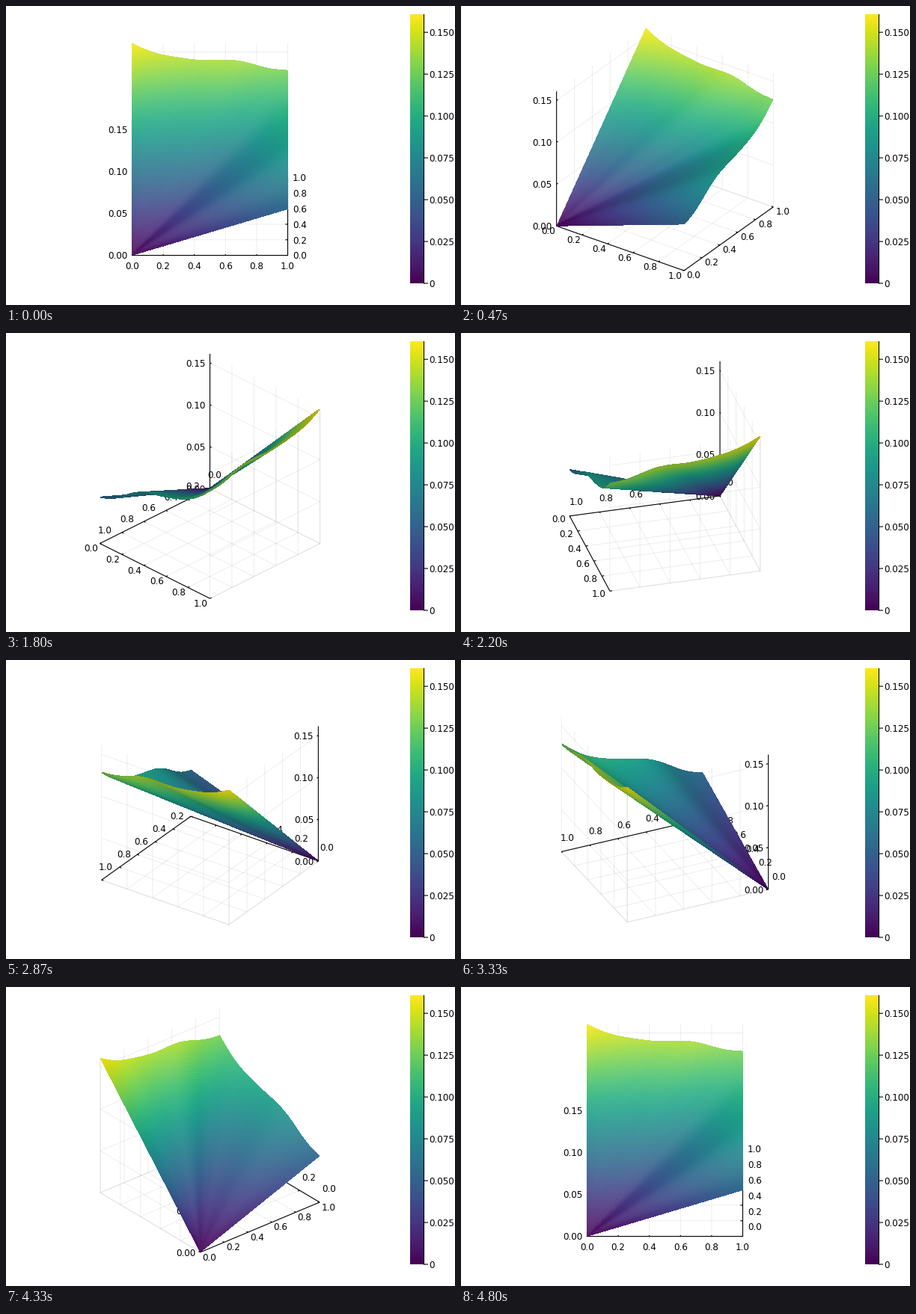
Recreate the animation shown at these times as a matplotlib script. Size 600 px wide and 400 px high, loop 4870 ms.

```python
import numpy as np
import matplotlib.pyplot as plt
from matplotlib.animation import FuncAnimation
from matplotlib.collections import LineCollection, PolyCollection

WIDTH, HEIGHT, DPI = 600, 400, 100
FRAMES, STEP_MS = 73, 66.66      # 15 pictures a second, 5 degrees each
PX = 72 / DPI                    # points per pixel
CENTER, SIDE = (272.5, 191.5), 208
SIN_EL, COS_EL = 0.5, np.sqrt(0.75)
Z_MAX = 0.1608
FONT = dict(family="DejaVu Sans", size=12 * PX, color="black")
TICK, LABEL_GAP = 0.015, 6.3

xy_ticks = np.linspace(0, 1, 6)
z_ticks = np.arange(4) * 0.05
viridis = plt.get_cmap("viridis")


def project(points, az):
    """Orthographic view of unit-cube points, in stage pixels."""
    x, y, z = np.moveaxis(np.asarray(points, float) - 0.5, -1, 0)
    c, s = np.cos(az), np.sin(az)
    px = CENTER[0] + SIDE * (x * c + y * s)
    py = CENTER[1] + SIDE * (SIN_EL * (x * s - y * c) - COS_EL * z)
    return np.stack([px, py], axis=-1)


def wavy(t, start, end, waves):
    """Straight line from start to end plus a short sine series."""
    bumps = sum(b * np.sin(n * np.pi * t) for n, b in enumerate(waves, 1))
    return start + (end - start) * t + bumps


def height(x, y):
    """Surface that is linear along every ray from the origin."""
    r = np.maximum(x, y)
    t = np.minimum(x, y) / r
    low = wavy(t, 0.344, 0.8, (-0.017, 0.0275, -0.0183, -0.0047, -0.005))
    high = wavy(t, 1.0, 0.8, (-0.0282, -0.0253, -0.0076, 0.0039, -0.0058))
    return r * np.where(y <= x, low, high)


def make_cells(n=76):
    u = np.linspace(0.004, 0.996, n + 1)
    x, y = np.meshgrid(u, u, indexing="ij")
    p = np.stack([x, y, height(x, y)], axis=-1)
    quads = np.stack([p[:-1, :-1], p[1:, :-1], p[1:, 1:], p[:-1, 1:]], axis=2)
    return quads.reshape(-1, 4, 3)


cells = make_cells()
cell_mid = cells.mean(axis=1)
cell_color = viridis(cell_mid[:, 2])[:, :3]
normals = np.cross(cells[:, 2] - cells[:, 0], cells[:, 3] - cells[:, 1])
normals /= np.linalg.norm(normals, axis=1, keepdims=True)


def shaded_colors(az):
    """Headlight shading: darker edge-on, slightly whitened face-on."""
    view = np.array([COS_EL * np.sin(az), -COS_EL * np.cos(az), SIN_EL])
    light = 0.7 + 0.45 * np.abs(normals @ view)[:, None]
    white = np.maximum(light - 1, 0)
    return cell_color * np.minimum(light, 1) * (1 - white) + white


x_pos = [(t, 0, 0) for t in xy_ticks]
y_pos = [(1, t, 0) for t in xy_ticks]
z_pos = [(0, 0, t / Z_MAX) for t in z_ticks]

grid_paths = (
    [[(t, 0, 0), (t, 1, 0), (t, 1, 1)] for t in xy_ticks]
    + [[(1, t, 0), (0, t, 0), (0, t, 1)] for t in xy_ticks]
    + [[(0, 0, h), (0, 1, h), (1, 1, h)] for _, _, h in z_pos])
axis_paths = (
    [[(0, 0, 0), (1, 0, 0)], [(1, 0, 0), (1, 1, 0)], [(0, 0, 0), (0, 0, 1)]]
    + [[p, (p[0], TICK, 0)] for p in x_pos]
    + [[p, (1 - TICK, p[1], 0)] for p in y_pos]
    + [[p, (0, TICK, p[2])] for p in z_pos])

fig = plt.figure(figsize=(WIDTH / DPI, HEIGHT / DPI), dpi=DPI, facecolor="white")
ax = fig.add_axes([0, 0, 1, 1])


def put_label(text, x=0, y=0, ha="left"):
    return ax.text(x, y, text, ha=ha, va="baseline", zorder=3, **FONT)


def draw_colorbar():
    left, right, bottom, top = 540, 558, 371, 11
    ax.imshow(np.linspace(0, 1, 256)[:, None], cmap=viridis, origin="lower",
              extent=(left, right, bottom, top), aspect="auto",
              interpolation="nearest")
    line = dict(color="black", lw=1.1 * PX, solid_capstyle="butt", snap=False)
    ax.plot([right + 0.5] * 2, [bottom + 0.5, top], **line)
    for i in range(7):
        value = i * 0.025
        y = bottom + (top - bottom) * value / Z_MAX
        ax.plot([right, right + 6], [y, y], **line)
        put_label(f"{value:.3f}" if i else "0", right + 7.6, y + 4.6)


draw_colorbar()
ax.set_xlim(0, WIDTH)
ax.set_ylim(HEIGHT, 0)
ax.axis("off")

grid = LineCollection([], colors=[(0, 0, 0, 0.07)], linewidths=1 * PX, zorder=1)
axis_lines = LineCollection([], colors="black", linewidths=1.1 * PX, zorder=2)
surface = PolyCollection([], linewidths=0.8 * PX, antialiaseds=False, zorder=4)
for item in (grid, axis_lines, surface):
    item.set_snap(False)
    ax.add_collection(item, autolim=False)

x_labels = [put_label(f"{t:.1f}") for t in xy_ticks]
y_labels = [put_label(f"{t:.1f}") for t in xy_ticks]
z_labels = [put_label(f"{t:.2f}", ha="right") for t in z_ticks]


def label_layout(dx, dy):
    """Alignment and offset of tick labels for an axis heading (dx, dy up)."""
    phi = (np.degrees(np.arctan2(dy, dx)) - 90) % 360
    if abs(phi - 270) < 1e-6:
        ha, shift = "center", 8
    elif abs(phi - 90) < 1e-6:
        ha, shift = "center", -8
    elif 0 < phi < 180:
        ha, shift = "left", -12.5
    else:
        ha, shift = ("right" if 180 <= phi < 270 else "left"), 0.5
    rad = np.radians(phi)
    return ha, LABEL_GAP * np.cos(rad), shift - LABEL_GAP * np.sin(rad)


def place(labels, points, az, ha, dx, dy):
    for label, (px, py) in zip(labels, project(points, az)):
        label.set_ha(ha)
        label.set_position((px + dx, py + dy + 4.4))


def update(frame):
    az = np.radians(5 * frame)
    c, s = np.cos(az), np.sin(az)
    grid.set_segments([project(p, az) for p in grid_paths])
    axis_lines.set_segments([project(p, az) for p in axis_paths])

    place(x_labels, x_pos, az, *label_layout(c, -SIN_EL * s))
    place(y_labels, y_pos, az, *label_layout(s, SIN_EL * c))
    place(z_labels, z_pos, az, "right", -LABEL_GAP, 0.5)

    # paint the cells from back to front
    order = np.argsort(cell_mid[:, 0] * s - cell_mid[:, 1] * c, kind="stable")
    colors = shaded_colors(az)[order]
    surface.set_verts(project(cells[order], az))
    surface.set_facecolor(colors)
    surface.set_edgecolor(colors)
    return [grid, axis_lines, surface, *x_labels, *y_labels, *z_labels]


anim = FuncAnimation(fig, update, frames=FRAMES, interval=STEP_MS,
                     repeat=True, repeat_delay=0, blit=False)
plt.show()
```
